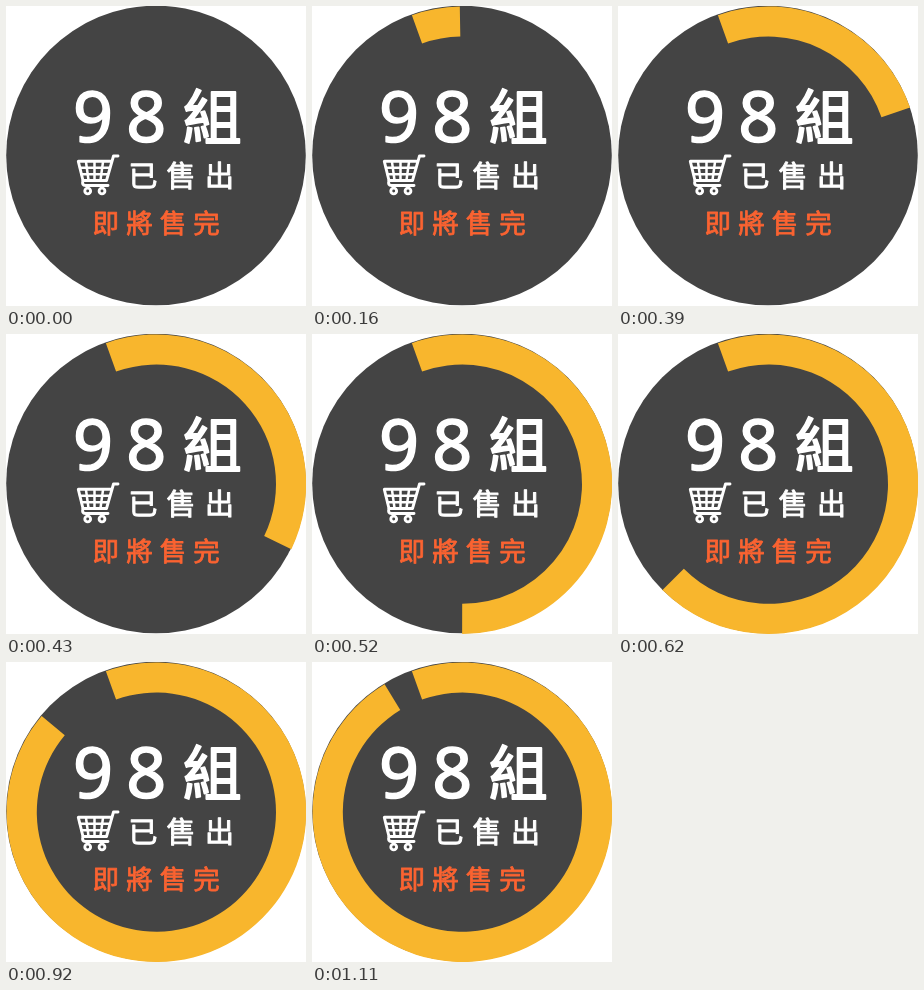
An HTML page for the animation above (1.21 s loop, 300x300 px).

```html
<!DOCTYPE html>
<html lang="zh-Hant">
<head>
<meta charset="utf-8">
<style>
  html, body { margin: 0; width: 100%; height: 100%; overflow: hidden; background: #fff; }
  svg { display: block; width: 300px; height: 300px; }
  text {
    fill: currentColor; stroke: currentColor; stroke-linejoin: round; text-anchor: middle;
    font-family: "Noto Sans CJK TC", "Noto Sans CJK", sans-serif;
  }
  .white { color: #fff; }
  .orange { color: #fb6331; }
  .digits { font: 70px "Noto Sans", "Open Sans", sans-serif; }
  .cart { fill: none; stroke: #fff; stroke-width: 2.9; stroke-linecap: round; stroke-linejoin: round; }
</style>
</head>
<body>
<svg viewBox="0 0 300 300">
  <circle cx="150" cy="149.5" r="149.8" fill="#444"/>
  <path id="ring" fill="#f8b62d"/>
  <g class="white">
    <text class="digits" x="87 140.3" y="136" stroke-width="1.6">98</text>
    <text x="206.3" y="132.8" font-size="59" stroke-width="1.9">組</text>
    <text x="137 175 213.5" y="181.2" font-size="29" stroke-width="1">已售出</text>
  </g>
  <text class="orange" x="99.7 133.6 167 200.6" y="227.4" font-size="26.5" stroke-width="0.8">即將售完</text>
  <g class="cart">
    <path d="M112 150H107.5L100.5 174.5H77L72.3 155.3H105"/>
    <path d="M74 161.8H103M75.5 168.2H101.5" stroke-width="2.5"/>
    <path d="M80 156L82.5 174M88.5 156V174M97 156L94.5 174" stroke-width="2.5"/>
    <path d="M77 174.5Q75.5 179.5 79.5 179.5H102"/>
    <circle cx="81.7" cy="185" r="2.9"/>
    <circle cx="96" cy="185" r="2.9"/>
  </g>
</svg>
<script>
  const ring = document.getElementById('ring');
  const CX = 150.4, CY = 150.2, OUTER = 149.8, INNER = 119.6;
  const START = -19.7;
  const LOOP = 1210;

  // Hold time of each step, and the clockwise angle from the top it reaches.
  const holds = [80, 80, 70, 60, 50, 40, 30, 20, 20, 30, 40, 50, 50, 60, 70, 80, 90, 90, 100, 100];
  const ends = [START, -10.5, -1, 12, 25.8, 49, 71, 93.5, 115.7, 137, 158.5, 180.1,
    202.2, 225, 247.5, 270.2, 291, 310, 320, 328.7];

  function point(r, deg) {
    const a = deg * Math.PI / 180;
    return (CX + r * Math.sin(a)).toFixed(2) + ' ' + (CY - r * Math.cos(a)).toFixed(2);
  }

  function sector(from, to) {
    if (to <= from) return '';
    const large = to - from > 180 ? 1 : 0;
    return `M${point(OUTER, from)}A${OUTER} ${OUTER} 0 ${large} 1 ${point(OUTER, to)}` +
      `L${point(INNER, to)}A${INNER} ${INNER} 0 ${large} 0 ${point(INNER, from)}Z`;
  }

  function stepAt(t) {
    let i = 0;
    while (i < holds.length - 1 && t >= holds[i]) t -= holds[i++];
    return i;
  }

  let shown = -1;
  let origin = null;
  function frame(now) {
    if (origin === null) origin = now;
    const step = stepAt((now - origin) % LOOP);
    if (step !== shown) {
      ring.setAttribute('d', sector(START, ends[step]));
      shown = step;
    }
    requestAnimationFrame(frame);
  }
  requestAnimationFrame(frame);
</script>
</body>
</html>
```
